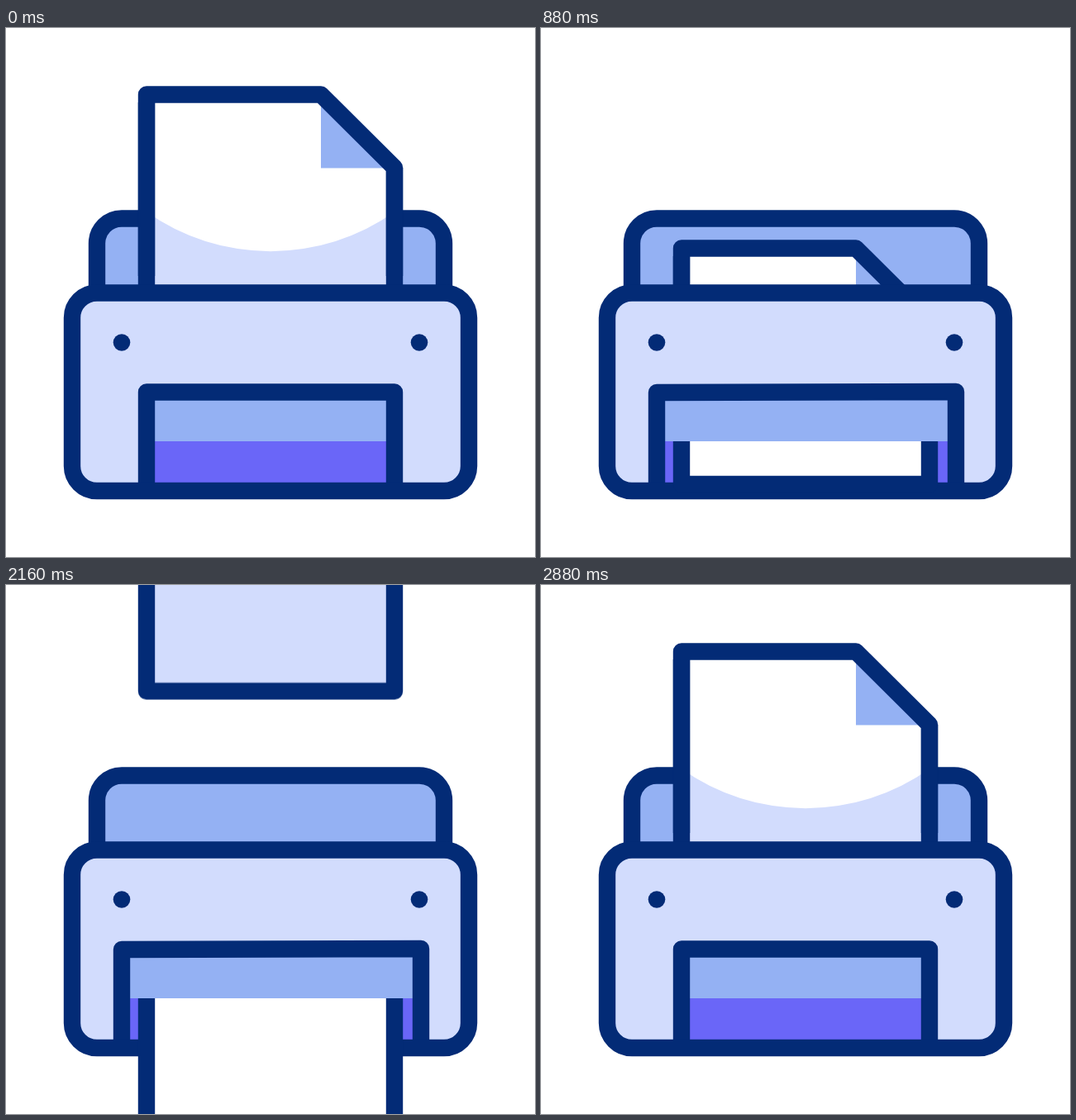
An HTML page without scripts that plays this animation: 640x640 px, repeating every 3000 ms.

```html
<!DOCTYPE html>
<html lang="en">
<head>
<meta charset="utf-8">
<title>Printer</title>
<style>
  html, body { margin: 0; width: 100%; height: 100%; overflow: hidden; background: #fff; }
  svg { display: block; width: 100%; height: 100%; }

  .line { stroke: #032b76; stroke-width: 20.4; stroke-linejoin: round; }
  .white { fill: #fff; }
  .pale { fill: #d2dcfd; }
  .mid { fill: #94b1f3; }
  .ink { fill: #032b76; }
  .open { fill: none; }

  .sheet, .cap, .print, .slot { animation: 3s linear infinite; }
  .sheet { animation-name: feed; }
  .cap { animation-name: lag; }
  .print { animation-name: eject; }
  .slot { animation-name: widen; }

  /* the sheet sinks into the tray, then a new one drops in from above */
  @keyframes feed {
    0%, 4% { transform: translateY(0); }
    37.333%, 62.66% { transform: translateY(244.4px); }
    62.667% {
      transform: translateY(-581.6px);
      animation-timing-function: cubic-bezier(.333, .667, .667, 1);
    }
    96%, 100% { transform: translateY(0); }
  }

  /* the upper outline arrives slightly behind the sheet */
  @keyframes lag {
    0%, 62.66% { transform: translateY(0); }
    62.667% {
      transform: translateY(-452px);
      animation-timing-function: cubic-bezier(.333, 1, .667, 1);
    }
    96%, 100% { transform: translateY(0); }
  }

  @keyframes eject {
    0%, 4% { transform: translateY(.8px); }
    37.333%, 40.333% { transform: translateY(160px); }
    49.667% { transform: translateY(182.5px); }
    54.167% {
      transform: translateY(182.5px);
      animation-timing-function: cubic-bezier(.333, 0, .667, 1);
    }
    96%, 100% { transform: translateY(597.5px); }
  }

  @keyframes widen {
    0%, 4%, 96%, 100% { d: path("M170 560L170 440.5L470 440.5L470 560"); }
    14%, 86% { d: path("M140 560L140 441L502 440L502 560"); }
  }
</style>
</head>
<body>
<svg viewBox="0 0 640 640">
  <defs>
    <clipPath id="above"><rect width="640" height="320"/></clipPath>
    <clipPath id="below"><rect y="500" width="640" height="140"/></clipPath>
    <linearGradient id="tray" gradientUnits="userSpaceOnUse" x1="0" y1="400" x2="0" y2="600">
      <stop offset=".5" stop-color="#94b1f3"/>
      <stop offset=".5" stop-color="#6a66f8"/>
    </linearGradient>
    <rect id="body" x="80" y="320.5" width="480" height="239.5" rx="30"/>
  </defs>

  <rect class="mid line" x="110" y="230.5" width="420" height="160" rx="30"/>

  <g clip-path="url(#above)">
    <g class="sheet">
      <path class="white" d="M170 80.5H381L470 169V294V429H170Z"/>
      <path class="pale" d="M170 222.5A260 260 0 0 0 470 222.5V429H170Z"/>
      <path class="mid" d="M381 80.5V169.5H470Z"/>
      <path class="open line" d="M170 90V429H470V169"/>
      <path class="cap open line" d="M170 300V80.5H381L470 169V300"/>
    </g>
  </g>

  <use href="#body" class="pale"/>
  <path class="slot line" fill="url(#tray)" d="M170 560L170 440.5L470 440.5L470 560"/>
  <use href="#body" class="open line"/>
  <circle class="ink" cx="140" cy="380.5" r="10.3"/>
  <circle class="ink" cx="500" cy="380.5" r="10.3"/>

  <g clip-path="url(#below)">
    <rect class="print white line" x="170" y="63" width="300" height="367"/>
  </g>
</svg>
</body>
</html>
```
